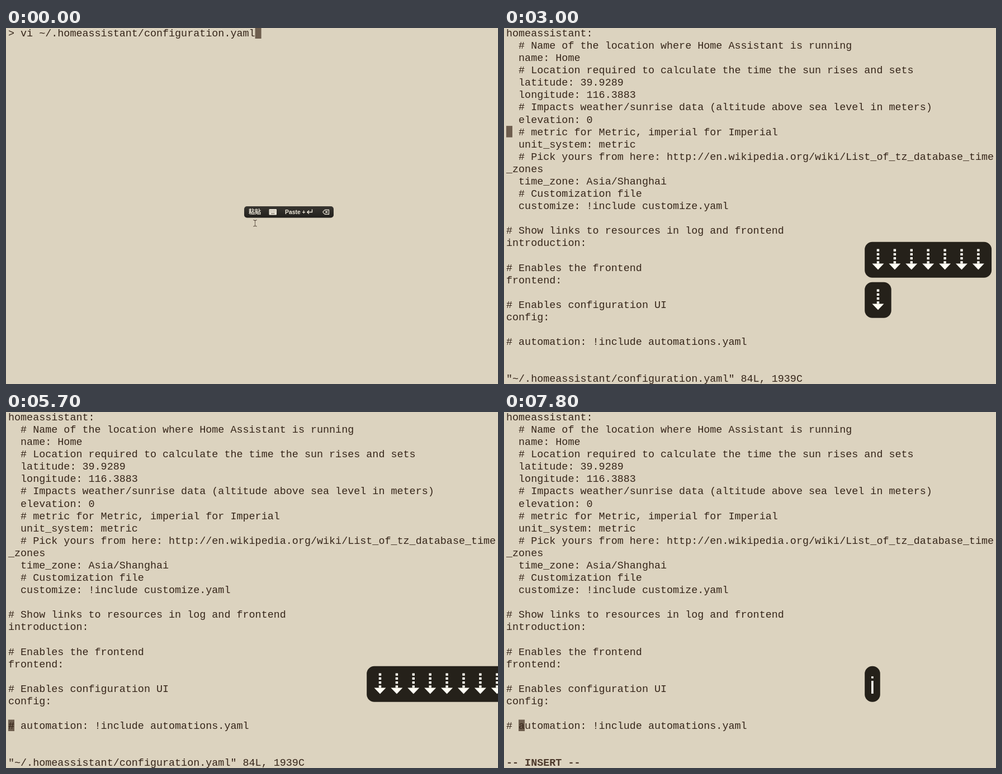
Write an HTML page with a canvas that moves like this. It is 880 by 637 pixels and loops after 8000 ms.

```html
<!DOCTYPE html>
<html lang="en">
<head>
<meta charset="utf-8">
<title>Editing configuration.yaml</title>
<style>
html, body { margin: 0; width: 100%; height: 100%; overflow: hidden; background: #dcd3bf; }
canvas { display: block; }
</style>
</head>
<body>
<canvas id="stage" width="880" height="637"></canvas>
<script>
const ctx = document.getElementById('stage').getContext('2d');
const LOOP = 8000, STEP = 300;
const CELL = 11.04, LINE = 22.08, LEFT = 4;
const PAPER = '#dcd3bf', INK = '#36261a', CURSOR = '#6e5e4e', BEZEL = '#25211a', WHITE = '#fffdf4';
const MONO = '18.4px "Liberation Mono", "Courier New", monospace';
const COMMAND = '> vi ~/.homeassistant/configuration.yaml';
const STATUS = '"~/.homeassistant/configuration.yaml" 84L, 1939C';
const FILE = `homeassistant:
  # Name of the location where Home Assistant is running
  name: Home
  # Location required to calculate the time the sun rises and sets
  latitude: 39.9289
  longitude: 116.3883
  # Impacts weather/sunrise data (altitude above sea level in meters)
  elevation: 0
  # metric for Metric, imperial for Imperial
  unit_system: metric
  # Pick yours from here: http://en.wikipedia.org/wiki/List_of_tz_database_time
_zones
  time_zone: Asia/Shanghai
  # Customization file
  customize: !include customize.yaml

# Show links to resources in log and frontend
introduction:

# Enables the frontend
frontend:

# Enables configuration UI
config:

# automation: !include automations.yaml`.split('\n');

// Total presses of the down key at each step, from the first press on
const FIRST_PRESS = 5;
const PRESSES = [1, 2, 3, 5, 7, 8, 10, 12, 14, 16, 18, 20, 22, 23, 24];

function text(str, x, y, font, color) {
  ctx.font = font;
  ctx.fillStyle = color;
  ctx.fillText(str, x, y);
}

function box(x, y, w, h, r, fill) {
  ctx.fillStyle = fill;
  ctx.beginPath();
  ctx.roundRect(x, y, w, h, r);
  ctx.fill();
}

function line(points, width, color) {
  ctx.strokeStyle = color;
  ctx.lineWidth = width;
  ctx.beginPath();
  points.forEach(([x, y]) => ctx.lineTo(x, y));
  ctx.stroke();
}

// Terminal text: each character sits in its own cell
function row(str, n, color = INK, weight = '') {
  [...str].forEach((c, i) =>
    text(c, LEFT + i * CELL, 15 + n * LINE, weight + MONO, color));
}

function cursor(n, col) {
  ctx.fillStyle = CURSOR;
  ctx.fillRect(LEFT + col * CELL, n * LINE - 1.5, 11, 20.5);
}

// Dashed arrow pointing along +x, tip at the given length
function arrow(x, y, angle, length) {
  const head = length - 11, dash = 4.3;
  ctx.save();
  ctx.translate(x, y);
  ctx.rotate(angle);
  ctx.fillStyle = WHITE;
  for (let i = 0; i < 4; i++) ctx.fillRect(i * (head - dash) / 3, -2.2, dash, 4.4);
  ctx.beginPath();
  ctx.moveTo(head, -10.5);
  ctx.lineTo(length, 0);
  ctx.lineTo(head, 10.5);
  ctx.fill();
  ctx.restore();
}

function keys(kind, count, raised, alpha) {
  if (count < 1 || !alpha) return;
  const pitch = { down: 29.9, right: 46.2, i: 10 }[kind];
  const y = raised ? 383 : 455;
  ctx.globalAlpha = alpha;
  box(645.2, y - 0.3, 17.6 + pitch * count, 64, 13.5, BEZEL);
  for (let i = 0; i < count; i++) {
    if (kind === 'down') arrow(669 + i * pitch, y + 12.5, Math.PI / 2, 37);
    if (kind === 'right') arrow(659 + i * pitch, y + 32.5, 0, 37.5);
    if (kind === 'i') text('i', 654.2, y + 48.5, '42px "Liberation Sans", Arial, sans-serif', WHITE);
  }
  ctx.globalAlpha = 1;
}

function popup(alpha) {
  ctx.globalAlpha = alpha;
  const shade = ctx.createLinearGradient(0, 319, 0, 340);
  shade.addColorStop(0, '#393631');
  shade.addColorStop(1, '#211f1c');
  box(426, 319, 160, 20.5, 5, shade);
  const pale = '#eee8da';
  text('粘贴', 434, 333.3, 'bold 11px "Noto Sans CJK SC", "Noto Sans CJK", sans-serif', pale);
  text('Paste +', 499, 333, 'bold 10.4px "Liberation Sans", Arial, sans-serif', pale);

  // Keyboard
  box(470.5, 324, 13.5, 10.5, 1, pale);
  ctx.fillStyle = '#5b554b';
  for (let i = 0; i < 4; i++) {
    ctx.fillRect(472.5 + i * 2.7, 326, 1, 1);
    ctx.fillRect(472.5 + i * 2.7, 328.5, 1, 1);
  }
  ctx.fillRect(474, 331.5, 6.5, 1);

  // Return and delete
  line([[547.5, 324.5], [547.5, 329.5], [540, 329.5]], 1.4, pale);
  line([[542, 326.5], [538.8, 329.5], [542, 332.5]], 1.4, pale);
  line([[566.5, 329.3], [570.5, 325.3], [577.5, 325.3], [577.5, 333.3], [570.5, 333.3], [566.5, 329.3]], 1.2, pale);
  line([[571.2, 327.2], [575.2, 331.4]], 1.2, pale);
  line([[575.2, 327.2], [571.2, 331.4]], 1.2, pale);

  // Mouse pointer
  line([[442.5, 343.5], [445.5, 344.5], [448.5, 343.5]], 1, INK);
  line([[442.5, 355], [445.5, 354], [448.5, 355]], 1, INK);
  ctx.setLineDash([2, 1]);
  line([[445.5, 344.5], [445.5, 354]], 1, INK);
  ctx.setLineDash([]);
  ctx.globalAlpha = 1;
}

// Full until the given step, half faded during it, then gone
const fade = (step, at) => step < at ? 1 : step === at ? 0.5 : 0;

function shell(step) {
  cursor(0, COMMAND.length);
  row(COMMAND, 0);
  popup(fade(step, 1));
}

function editor(step) {
  const index = Math.min(step - FIRST_PRESS, PRESSES.length - 1);
  const downs = index < 0 ? 0 : PRESSES[index];
  const rights = Math.max(0, Math.min(2, step - 20));
  const insert = step >= 26;

  // The address takes up two rows
  cursor(downs > 10 ? downs + 1 : downs, rights);
  FILE.forEach((str, n) => row(str, n));
  if (insert) row('-- INSERT --', 28, '#4c392b', 'bold ');
  else row(STATUS, 28);

  keys('down', Math.min(downs, 7), downs > 7, fade(step, 11));
  keys('down', downs - 7, rights > 0, fade(step, 21));
  keys('right', rights, false, fade(step, 24));
  keys('i', insert ? 1 : 0, false, 1);
}

function draw() {
  const step = Math.floor(performance.now() % LOOP / STEP);
  ctx.fillStyle = PAPER;
  ctx.fillRect(0, 0, 880, 637);
  (step < 2 ? shell : editor)(step);
  requestAnimationFrame(draw);
}
draw();
</script>
</body>
</html>
```
